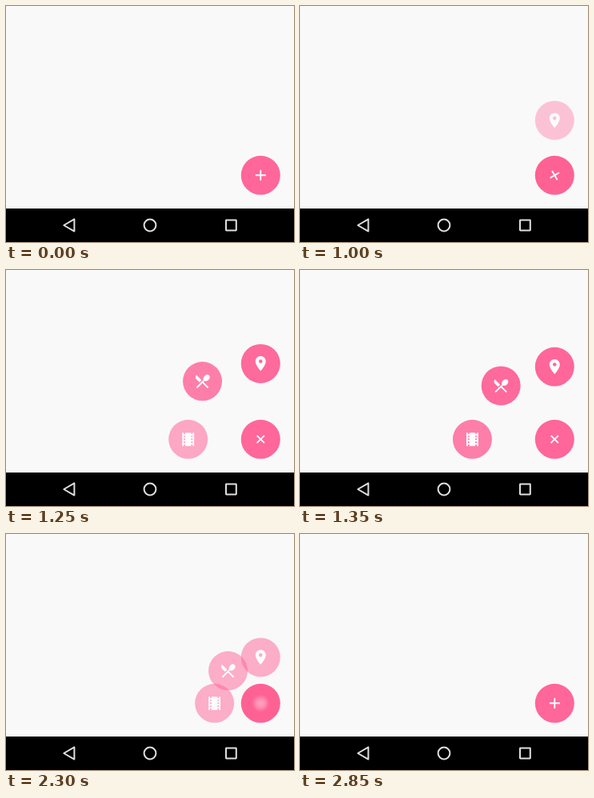
Write an HTML page that moves like this. It is 360 px wide and 296 px high and loops after 3050 ms.

```html
<!DOCTYPE html>
<html lang="en">
<head>
<meta charset="utf-8">
<title>Floating action menu</title>
<style>
  html, body { margin: 0; width: 100%; height: 100%; overflow: hidden; background: #f9f9f9; }
  svg { display: block; width: 360px; height: 296px; }
  .disc { fill: #ff6699; }
  .pressed { fill: #fe6294; }
  .icon { fill: #fff; transform: scale(.93) translate(-12px, -12px); }
  .nav { fill: none; stroke: #dfdfdf; stroke-width: 2; stroke-linejoin: round; }
</style>
</head>
<body>
<svg viewBox="0 0 360 296">
  <defs>
    <radialGradient id="glow">
      <stop offset="0" stop-color="#fff" stop-opacity=".42"/>
      <stop offset=".45" stop-color="#fff" stop-opacity=".3"/>
      <stop offset="1" stop-color="#fff" stop-opacity="0"/>
    </radialGradient>
  </defs>
  <rect width="360" height="296" fill="#f9f9f9"/>

  <g class="item">
    <circle class="disc" r="24.5"/>
    <path class="icon" d="M12 2C8.13 2 5 5.13 5 9c0 5.25 7 13 7 13s7-7.75 7-13c0-3.87-3.13-7-7-7zm0 9.5a2.5 2.5 0 0 1 0-5 2.5 2.5 0 0 1 0 5z"/>
  </g>
  <g class="item">
    <circle class="disc" r="24.5"/>
    <path class="icon" d="M8.1 13.34l2.83-2.83L3.91 3.5c-1.56 1.56-1.56 4.09 0 5.66l4.19 4.18zm6.78-1.81c1.53.71 3.68.21 5.27-1.38 1.91-1.91 2.28-4.65.81-6.12-1.46-1.46-4.2-1.1-6.12.81-1.59 1.59-2.09 3.74-1.38 5.27L3.7 19.87l1.41 1.41L12 14.41l6.88 6.88 1.41-1.41L13.41 13z"/>
  </g>
  <g class="item">
    <circle class="disc" r="24.5"/>
    <path class="icon" d="M18 3v2h-2V3H8v2H6V3H4v18h2v-2h2v2h8v-2h2v2h2V3zM8 17H6v-2h2zm0-4H6v-2h2zm0-4H6V7h2zm10 8h-2v-2h2zm0-4h-2v-2h2zm0-4h-2V7h2z"/>
  </g>

  <g transform="translate(318.3 212.3)">
    <circle id="fab" class="disc" r="24.5"/>
    <g id="plus"><path class="icon" d="M19 13h-6v6h-2v-6H5v-2h6V5h2v6h6z"/></g>
    <circle id="blur" r="11" fill="url(#glow)"/>
  </g>

  <rect y="254" width="360" height="42"/>
  <g class="nav">
    <path d="M72.3 275L85.4 267.4V282.6Z"/>
    <circle cx="180" cy="275" r="7.4"/>
    <rect x="275" y="268.5" width="12.8" height="13" rx=".4"/>
  </g>
</svg>
<script>
  const LOOP = 3050, STEP = 50, DURATION = 400;
  const OPEN = 818, CLOSE = 2267, STAGGER = 100, FADE_OUT = 115;
  const CENTER = 318.3, MIDDLE = 212.3, RADIUS = 91, TURN = 135;

  const items = [...document.querySelectorAll('.item')];
  const [fab, plus, blur] = ['fab', 'plus', 'blur'].map(id => document.getElementById(id));

  const progress = (t, start, length) => Math.min(1, Math.max(0, (t - start) / length));
  const overshoot = p => 1 + (p - 1) ** 2 * (3 * (p - 1) + 2);
  const decelerate = p => 1 - (1 - p) ** 2;
  const show = (el, on) => el.setAttribute('visibility', on ? 'visible' : 'hidden');

  function draw(t) {
    const closing = t >= CLOSE;
    const back = overshoot(progress(t, CLOSE, DURATION));

    items.forEach((item, i) => {
      const p = progress(t, OPEN + STAGGER * (i + 1), DURATION);
      const reach = RADIUS * (closing ? Math.max(0, 1 - back) : overshoot(p));
      const alpha = closing ? 1 - decelerate(progress(t, CLOSE, FADE_OUT)) : decelerate(p);
      const angle = Math.PI / 2 + i * Math.PI / 4;
      const x = CENTER + reach * Math.cos(angle);
      const y = MIDDLE - reach * Math.sin(angle);
      item.setAttribute('transform', `translate(${x} ${y})`);
      item.setAttribute('opacity', alpha);
    });

    const turn = closing ? 1 - back : overshoot(progress(t, OPEN, DURATION));
    plus.setAttribute('transform', `rotate(${TURN * turn})`);

    // The icon smears while it spins fastest
    const since = t - (closing ? CLOSE : OPEN);
    const smeared = since >= 0 && since < STEP;
    show(plus, !smeared);
    show(blur, smeared);
    fab.classList.toggle('pressed', since >= 0 && since < 350);
  }

  const origin = performance.now();
  function tick() {
    const t = (performance.now() - origin) % LOOP;
    draw(Math.floor((t + 1) / STEP) * STEP % LOOP);
    requestAnimationFrame(tick);
  }
  tick();
</script>
</body>
</html>
```
